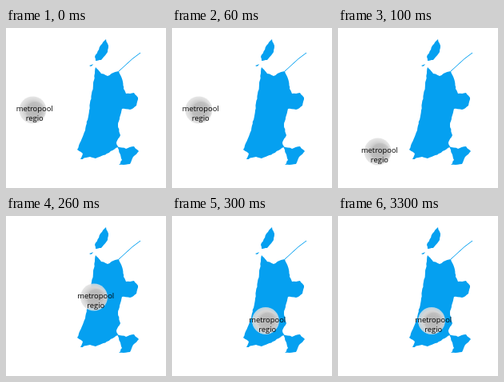
These frames come from a looping animation (200 px wide and 200 px high, 5.3 s). An HTML page with a canvas:

```html
<!DOCTYPE html>
<html lang="nl">
<head>
<meta charset="utf-8">
<style>
html, body { margin: 0; width: 100%; height: 100%; overflow: hidden; background: #fff; }
canvas { display: block; }
</style>
</head>
<body>
<canvas id="stage" width="200" height="200"></canvas>
<script>
const ctx = document.getElementById('stage').getContext('2d');
const LOOP = 5300, STEP = 100;
const BLUE = '#05a0f0';

// Ball centre at each hard step; the last one is held.
const stops = [[33.5, 102.5], [49.7, 154.5], [110, 101.5], [117, 131]];

let seed = 7;
function jitter(size) {
  seed = (seed * 16807) % 2147483647;
  return (seed / 2147483647 - 0.5) * size;
}

// Closed coastline through a few key points, roughened between them.
function coast(points) {
  const path = new Path2D();
  points.forEach(([x, y], i) => {
    const [nx, ny] = points[(i + 1) % points.length];
    const parts = Math.ceil(Math.hypot(nx - x, ny - y) / 3);
    path.lineTo(x, y);
    for (let k = 1; k < parts; k++) {
      path.lineTo(x + (nx - x) * k / parts + jitter(1), y + (ny - y) * k / parts + jitter(1));
    }
  });
  path.closePath();
  return path;
}

const land = [
  // island and sandbank
  coast([[125, 14], [128, 22], [127, 30], [119, 40], [112, 41], [111, 36], [118, 22]]),
  coast([[104, 47], [109, 45], [106, 48]]),
  // mainland
  coast([[112, 49], [115, 52], [119, 57], [127, 60], [134, 56], [141, 54], [146, 67],
    [147, 76], [150, 82], [160, 81], [165, 87], [163, 97], [155, 102], [145, 101],
    [142, 112], [140, 121], [143, 134], [138, 143], [140, 149], [126, 157], [112, 163],
    [105, 161], [93, 164], [96, 157], [89, 152], [99, 128], [104, 103], [110, 65]]),
  // south-east corner
  coast([[139, 148], [150, 151], [160, 148], [166, 154], [159, 161], [155, 170],
    [141, 171], [145, 165]])
];

function drawMap() {
  ctx.fillStyle = ctx.strokeStyle = BLUE;
  land.forEach(path => ctx.fill(path));
  ctx.beginPath();
  ctx.moveTo(141, 54);
  ctx.lineTo(158, 38.5);
  ctx.lineTo(168, 31);
  ctx.stroke();
}

function disc(x, y, r, fill) {
  ctx.fillStyle = fill;
  ctx.beginPath();
  ctx.arc(x, y, r, 0, Math.PI * 2);
  ctx.fill();
}

function drawBall(x, y) {
  const shade = ctx.createRadialGradient(x + 3, y + 1, 0, x, y, 17);
  shade.addColorStop(0, '#b8b8b8');
  shade.addColorStop(0.55, '#c4c4c4');
  shade.addColorStop(0.75, '#d6d6d6');
  shade.addColorStop(1, 'rgba(224,224,224,.8)');
  disc(x, y, 17, shade);
  disc(x + 3.5, y + 1.5, 12, 'rgba(175,175,175,.3)');
}

function drawLabel(x, y) {
  ctx.fillStyle = '#000';
  ctx.font = '500 9.4px "Open Sans", "Noto Sans", sans-serif';
  ctx.textAlign = 'center';
  ctx.fillText('metropool', x + 2.2, y + 1.5);
  ctx.fillText('regio', x + 2.2, y + 13.5);
}

function draw(time) {
  const step = Math.min(stops.length - 1, Math.floor((time % LOOP) / STEP));
  const [x, y] = stops[step];
  ctx.clearRect(0, 0, 200, 200);
  drawMap();
  drawBall(x, y);
  drawLabel(x, y);
}

const start = performance.now();
function tick() {
  draw(performance.now() - start);
  requestAnimationFrame(tick);
}
tick();
</script>
</body>
</html>
```
